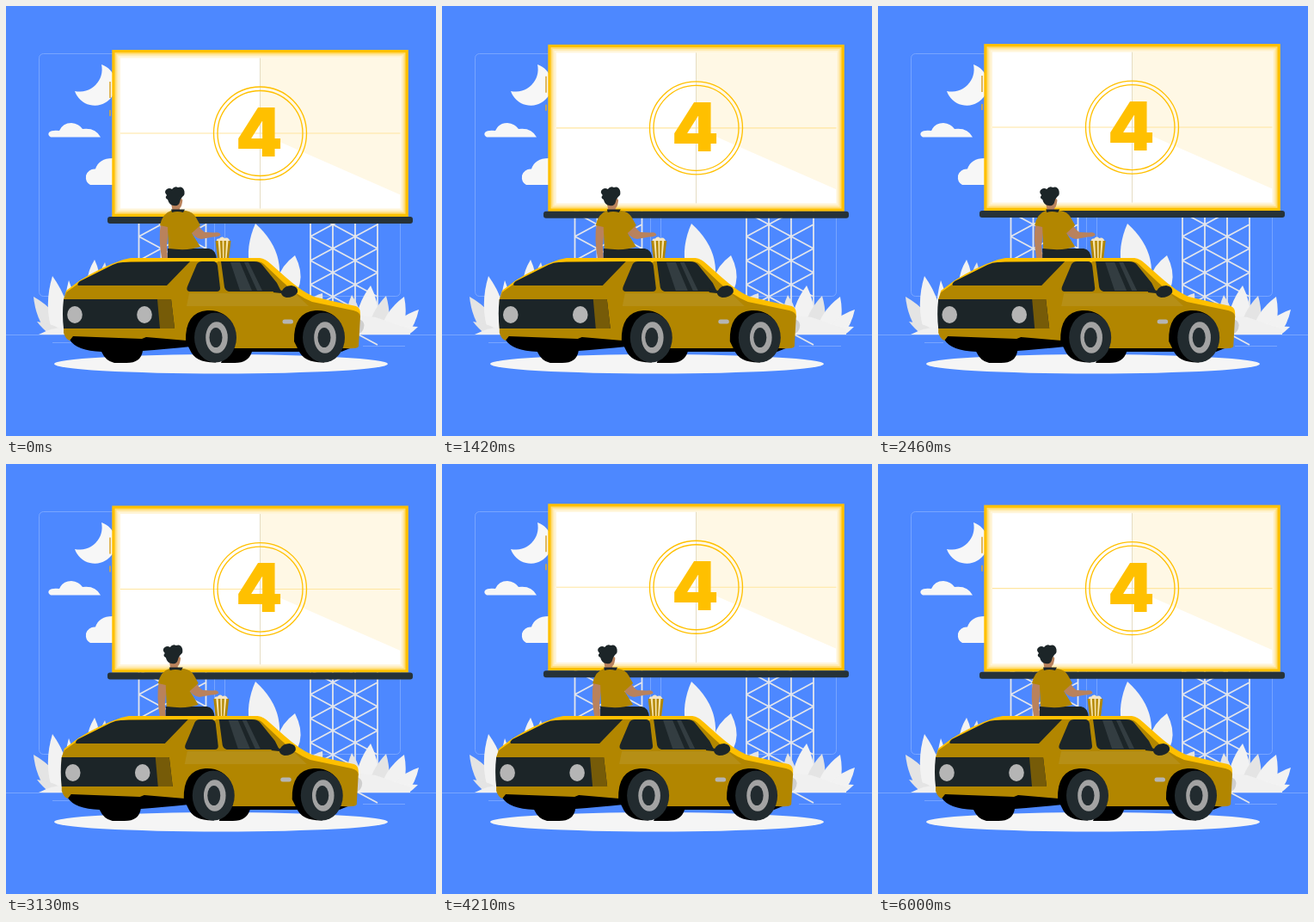
Recreate the animation shown at these times as an HTML page. Size 500 by 500 pixels, loop 6040 ms.

```html
<!DOCTYPE html>
<html lang="en">
<head>
<meta charset="utf-8">
<title>Drive-in cinema</title>
<style>
html, body { margin: 0; width: 100%; height: 100%; overflow: hidden; background: #4d88ff; }
svg { display: block; width: 100vw; height: 100vh; }
.line { fill: none; stroke: #83adff; stroke-width: .8; }
.tower { fill: none; stroke: #e3e6ec; stroke-width: 1.8; }
.cloud { fill: #f7f7f7; }
.gold { fill: #ffc000; }
.ring { fill: none; stroke: #ffc000; stroke-width: 1.3; }
.body { fill: #b28600; }
.dark { fill: #1c2528; }
.tyre { fill: #222b2f; }
.rim { fill: #a3a3a3; }
.lamp { fill: #b5b5b5; }
.skin { fill: #b9825c; }
.four { font: 900 78px Inter, "Open Sans", sans-serif; fill: #ffc000; text-anchor: middle; }
</style>
</head>
<body>
<svg viewBox="0 0 500 500">
  <clipPath id="ground"><path d="M0 0H500V382H0Z"/></clipPath>
  <rect width="500" height="500" fill="#4d88ff"/>
  <g class="line">
    <rect x="38.5" y="55.5" width="204" height="282" rx="5"/>
    <rect x="254.5" y="55.5" width="204" height="282" rx="5"/>
    <path d="M0 382.5H500M54 391.5H76M415 395.5H464"/>
  </g>
  <path class="cloud" d="M111 68A24.5 24.5 0 1 1 80 99A26 26 0 0 0 111 68Z"/>
  <path class="cloud" d="M52 152.5Q48 150 50 147Q53 144 62 145Q66 136 76 136Q85 137 89 143Q104 141 110 152.5Z"/>
  <path class="cloud" d="M98 208Q92 205 93 197Q96 189 104 189.500Q108 177 124 177H130V208Z"/>
  <path id="towers" class="tower"/>
  <g id="leaves" clip-path="url(#ground)"></g>
  <ellipse cx="250" cy="416.300" rx="194" ry="11.200" fill="#f5f5f5"/>

  <g id="screen">
    <path d="M121 88V107M121 121V128" stroke="#d9a836" stroke-width="1.6"/>
    <rect class="gold" x="123.300" y="51" width="344.500" height="194"/>
    <rect x="126.500" y="54.200" width="338" height="187.500" fill="#ffdc73"/>
    <rect x="128.500" y="56.200" width="334" height="183.500" fill="#ffebb3"/>
    <rect x="130.500" y="58.200" width="330" height="179.500" fill="#fff5d9"/>
    <rect x="133" y="60.500" width="325.500" height="175" fill="#fff"/>
    <path d="M295.500 148V60.500H458.500V219.500Z" fill="#fff8e5"/>
    <path d="M133 148H458.500" stroke="#ffe6a0" stroke-width="1.1"/>
    <path d="M295.500 60.500V235.500" stroke="#e2dabd" stroke-width=".9"/>
    <circle class="ring" cx="295.500" cy="148" r="54"/>
    <circle class="ring" cx="295.500" cy="148" r="49.500"/>
    <text class="four" x="294.500" y="174.900">4</text>
    <rect x="118" y="245" width="355" height="8" rx="3" fill="#263238"/>
  </g>

  <g id="car">
    <!-- viewer -->
    <path class="skin" d="M191 224H203Q206 224 205 228Q204 234 202 235V240H194Z"/>
    <path class="skin" d="M180 253Q177 270 181 293H188L187 278L190 254Z"/>
    <path class="skin" d="M214 261L223 253Q226 260 231 263L242 263.500Q249 262 249.500 266.500Q246 269 241 268.500L227 271Q219 270 214 261Z"/>
    <path class="dark" d="M188 282H236Q244 283 245 295H188Z"/>
    <path class="body" d="M192 238H209Q217 239 221 246L226 255L216 264L226 280Q212 285 189 282L188 257L179 255Q182 241 192 238Z"/>
    <path class="dark" d="M192 236.500H208L206 240Q199 238 193 240Z"/>
    <path class="dark" d="M188 225Q184 223 187 220Q183 216 187 213Q190 211 193 213Q196 209 200 211Q205 209 207 214Q209 219 205 222Q203 224 202 228Q201 233 195 232Q190 232 188 225Z"/>
    <!-- popcorn -->
    <path d="M245 274Q244 270 248 270.500Q251 267 254 270Q259 268 260.500 274Z" fill="#f3e6c8"/>
    <path class="body" d="M243.500 273H261.500L259 294H246Z"/>
    <path d="M246.500 273H249L250 294H248.500ZM251.500 273H253.500V294H252ZM256 273H258.500L256.500 294H255Z" fill="#f6e3a8"/>

    <!-- underside and far wheels -->
    <path d="M73 382H215V396Q185 399 159 401Q157 415 140 415H126Q116 413 111 402Q82 401 74 388Z"/>
    <path d="M258 392H400V398L390 402H286Q282 415 266 415H250Z"/>
    <path d="M409 364Q416 365 416.500 371Q416 379 410 381Z" fill="#cfcfcf"/>

    <!-- shell -->
    <path class="gold" d="M67 342L70 331L86 319Q110 304 136 295L145 293H295Q302 294 308 300L326 316Q344 332 358 338Q382 344 407 349Q412 351 412 357V362H70Z"/>
    <path class="body" d="M67 341L70 333L84 323L137 298L145 297H292Q298 297 303 303L322 321Q340 338 356 344L404 354Q412 356 412 361L410 396Q408 399 395 398H258L210 389L163 385L158 387L78 384L74 389Q69 387 67 380Z"/>
    <path d="M213 334H336L352 349H210Z" fill="#b68f16"/>
    <path class="gold" d="M240 293H246V298H240Z"/>
    <path class="dark" d="M86 320L124 301Q130 298 136 298L214 297L187 325H84Q82 323 86 320Z"/>
    <path class="dark" d="M222 300Q224 297 228 297H241Q245 297 246 302L249 328Q249 332 245 332H213Q209 331 211 326Z"/>
    <path class="dark" d="M250 297H288Q295 297 298 301L315 322L320 332H259Q255 331 254 327Z"/>
    <path d="M261 298H272L286 331H272ZM277 298H282L298 331H292Z" fill="#333d41"/>
    <path class="dark" d="M310 328L321 331Q324 325 332 325Q340 326 339 333Q335 339 326 339Q321 338 320 334L311 333Z"/>
    <path class="dark" d="M67 341H192L196 375H67Q65 358 67 341Z"/>
    <path d="M176 341H192L196 375H179Z" fill="#765b08"/>
    <ellipse class="lamp" cx="80" cy="359" rx="8.800" ry="10"/>
    <ellipse class="lamp" cx="161" cy="359" rx="8.800" ry="10"/>
    <rect class="lamp" x="321.500" y="364.500" width="12.500" height="5" rx="2.500"/>
    <g id="wheel">
      <path d="M209 390Q208 356 234 354Q255 353 264 371L244 414.500Q220 415 214 400Z"/>
      <ellipse class="tyre" cx="243.500" cy="385.500" rx="24.500" ry="29"/>
      <ellipse class="rim" cx="245" cy="385.500" rx="12.800" ry="18.300"/>
      <ellipse class="tyre" cx="244" cy="385.500" rx="7.500" ry="11.500"/>
    </g>
    <use href="#wheel" x="126"/>
  </g>
</svg>
<script>
const $ = id => document.getElementById(id);

// Pointed leaf from a base to a tip
function leaf(x, y, tipX, tipY, width, fill = '#f2f2f2') {
  const length = Math.hypot(tipX - x, tipY - y);
  const px = -(tipY - y) / length * width, py = (tipX - x) / length * width;
  const mx = (x + tipX) / 2, my = (y + tipY) / 2;
  return `<path fill="${fill}" d="M${x} ${y}Q${mx + px} ${my + py} ${tipX} ${tipY}Q${mx - px} ${my - py} ${x} ${y}Z"/>`;
}

// Four posts joined by two mirrored sets of parallel braces
function tower(x) {
  let d = '';
  for (const dx of [0, 26, 52, 78]) d += `M${x + dx} 225V380`;
  for (let y = 240; y < 360; y += 28)
    d += `M${x} ${y}l78 42M${x} ${y}l78 -42`;
  return d;
}

$('towers').setAttribute('d', tower(154.5) + tower(354));

const shade = '#e4e4e4';
$('leaves').innerHTML = [
  [74, 402, 32, 338, 20, shade], [70, 410, 54, 314, 24], [78, 400, 73, 319, 14],
  [84, 394, 36, 367, 12, shade], [100, 350, 103, 295, 15], [110, 350, 115, 298, 12, shade],
  [310, 345, 290, 253, 34], [322, 350, 336, 290, 26], [350, 360, 368, 334, 14, shade],
  [408, 400, 402, 336, 18, shade], [416, 410, 424, 325, 26], [424, 410, 442, 337, 22, shade],
  [436, 408, 463, 338, 24], [436, 402, 480, 353, 19], [424, 393, 479, 373, 14]
].map(a => leaf(...a)).join('') +
  '<path fill="#f0f0f0" d="M38 382Q56 372 75 374V382ZM395 382V358L430 362L470 376V382Z"/>';

const LOOP = 6040, shake = [0, -1, 2, -4, 4, -4, 4, -4, 2, -1, 0, 0];

function draw() {
  const t = performance.now() % LOOP;
  const step = Math.min(t / 600, 10), i = Math.floor(step);
  const x = shake[i] + (shake[i + 1] - shake[i]) * (step - i);
  const phase = Math.max(0, t - 500) / 1500 % 2;
  const y = -10 * (1 - Math.abs(1 - phase));
  $('car').setAttribute('transform', `translate(${x} 0)`);
  $('screen').setAttribute('transform', `translate(0 ${y})`);
  requestAnimationFrame(draw);
}
draw();
</script>
</body>
</html>
```
